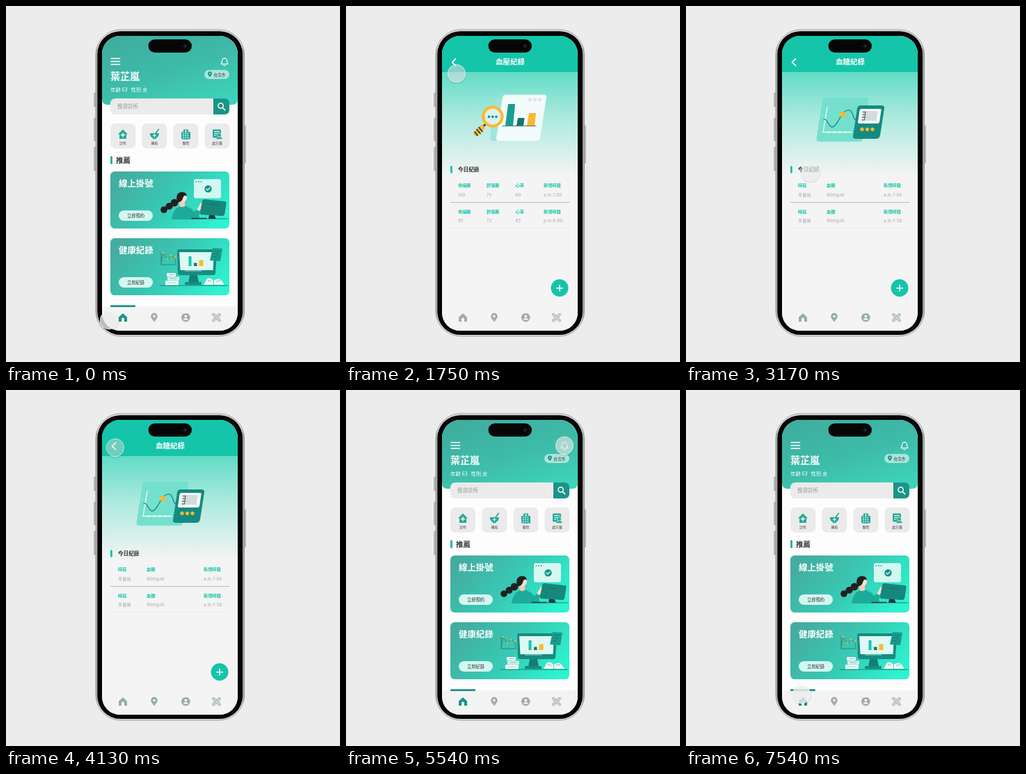
Animation of 480 by 512 pixels, one loop 7.58 s. Source, as an HTML page:

```html
<!DOCTYPE html>
<html lang="zh-Hant">
<head>
<meta charset="utf-8">
<title>健康 App</title>
<style>
html, body { margin: 0; width: 100%; height: 100%; overflow: hidden; background: #ececec; }
svg { display: block; width: 100vw; height: 100vh; }
text { font-family: "Noto Sans CJK TC", "Noto Sans CJK JP", "Noto Sans CJK", "Noto Sans", sans-serif; }
.latin { font-family: Inter, "Noto Sans", sans-serif; }
</style>
</head>
<body>
<svg id="stage" viewBox="0 0 480 512" xmlns="http://www.w3.org/2000/svg"></svg>
<script>
const LOOP = 7580;
const TEAL = '#14c5aa', DEEP = '#1a9488', GREY = '#a9a9a9', YELLOW = '#fbb92c';

const rect = (x, y, w, h, fill, rx = 0, extra = '') =>
  `<rect x="${x}" y="${y}" width="${w}" height="${h}" rx="${rx}" fill="${fill}" ${extra}/>`;
const dot = (x, y, r, fill, extra = '') => `<circle cx="${x}" cy="${y}" r="${r}" fill="${fill}" ${extra}/>`;
const shape = (d, fill, extra = '') => `<path d="${d}" fill="${fill}" ${extra}/>`;
const line = (d, color, width = 1) =>
  `<path d="${d}" fill="none" stroke="${color}" stroke-width="${width}" stroke-linecap="round" stroke-linejoin="round"/>`;
const text = (x, y, size, fill, str, weight = 400, extra = '') =>
  `<text x="${x}" y="${y}" font-size="${size}" fill="${fill}" font-weight="${weight}" xml:space="preserve" ${extra}>${str}</text>`;
const latin = (x, y, size, fill, str, weight = 400, extra = '') =>
  text(x, y, size, fill, str, weight, `class="latin" ${extra}`);
const at = (x, y, body) => `<g transform="translate(${x} ${y})">${body}</g>`;
const MID = 'text-anchor="middle"';

const pin = (color, hole) =>
  shape('M0 6.5C-2.5 3-4.8 1-4.8-1.7a4.8 4.8 0 0 1 9.6 0C4.8 1 2.5 3 0 6.5Z', color) + dot(0, -1.7, 1.7, hole);

const bell = (color, fill = 'none') =>
  `<path d="M-5 3.5Q-3.6 2-3.6-1a3.6 3.8 0 0 1 7.2 0Q3.6 2 5 3.5Z" fill="${fill}" stroke="${color}" stroke-width="1.2" stroke-linejoin="round"/>` +
  line('M-1.3 5.4Q0 6.2 1.3 5.4', color, 1.2);

function nav(bg, color, active = color) {
  const corner = [0, 90, 180, 270].map(a =>
    `<g transform="rotate(${a})">${line('M-5.5-2.8V-5.5H-2.8', color, 1.2)}` +
    rect(-3.8, -3.8, 3, 3, 'none', .6, `stroke="${color}" stroke-width="1.1"`) + '</g>').join('');
  return rect(138, 432, 195, 35, bg) +
    at(168, 448, shape('M-6-.5L0-6 6-.5V6H2V2.2a2 2 0 0 0-4 0V6H-6Z', active)) +
    at(213, 448, pin(color, bg)) +
    at(258.3, 448, dot(0, 0, 6.3, color) + dot(0, -1.8, 1.9, bg) + shape('M-3.5 3.4Q-3 .8 0 .8T3.5 3.4Z', bg)) +
    at(302.5, 448, corner);
}

function tile(x, label, icon) {
  return at(x, 169, rect(0, 0, 36, 36, '#ebebeb', 7) + at(18, 15.5, icon) +
    text(18, 30, 4.9, '#444', label, 500, MID));
}

function card(y, title, button, art) {
  return rect(150, y, 171, 82, 'url(#card)', 6) + text(162, y + 21.7, 12.4, '#fff', title, 700) +
    rect(162, y + 56, 49, 15, '#d3f8f1', 7.5) +
    text(186.5, y + 65.9, 6.3, '#333', button, 500, MID) + art;
}

const bookingArt =
  rect(270, 249, 39, 27.5, '#d3f8f1', 3) + [273.5, 277, 280.5].map(x => dot(x, 252.8, .9, DEEP)).join('') +
  dot(290.5, 263, 5.2, DEEP) + line('M288 263l1.8 1.8 3.2-3.4', '#fff', 1.1) +
  line('M238 306H318', '#1cab9a', 1.6) +
  shape('M245 291Q239 297 238 307H279L277 301 284 289 280 286 271 296Q262 287 252 287Z', '#1cab9a') +
  shape('M274 293L280 283 286 280 285 286 278 295Z', '#fbdcd0') +
  shape('M249 280H257V288Q252 291 249 287Z', '#f6c9bb') + dot(254, 276, 6, '#fbdcd0') +
  shape('M246 282Q243 271 250 268Q258 266 260 273Q255 271 254 277Q252 283 246 282Z', '#231f20') +
  dot(242, 283, 5.4, '#231f20') + dot(234.5, 288, 5, '#231f20') + dot(227, 293, 4.8, '#231f20') +
  shape('M292 300H299L302 306H291Z', '#243b3c') +
  shape('M285 278L314 281Q317 281 316.5 284L314 300Q313 302 311 302L281 300Q278 299 279 297L282 280Q283 278 285 278Z', '#17877c') +
  [294, 298, 302].map(x => line(`M${x} 284.5v2`, '#0d5f58', .9)).join('') +
  line('M267 305.5H288', '#243b3c', 1.4);

const recordArt =
  line('M222 402H318', '#17a493', 1.5) +
  line('M223 355V372H244', '#238177', .9) + line('M223 369L226 356 232 364 237 359 243 362 244 371', '#4c7466', .8) +
  [[226, 355], [232, 364], [237, 359], [243, 361]].map(p => dot(...p, 1.2, YELLOW)).join('') +
  shape('M249 350H300Q303 350 303 353L301 384Q301 387 298 387H250Q247 387 247 384L246 353Q246 350 249 350Z', '#178b7f') +
  shape('M249 354H299L297.5 380H250.5Z', '#dcf9f4') +
  rect(262.5, 360, 4, 14, TEAL) + rect(270, 369.5, 4.5, 4.5, '#17776f') + rect(277.5, 365.5, 6, 8.5, YELLOW) +
  rect(257, 380.5, 24, 1, '#8ed9cd') +
  shape('M264 387H275L277 398H262Z', '#137e74') + rect(257, 397, 24, 4, '#178b7f', 1.5) +
  shape('M297 348L311 349 308 367 293 366Z', '#1a9a8b') +
  line('M299 353h7M298 357h7M297.5 361h5', '#0f6f66', .8) +
  rect(231, 384, 13, 5, '#eefaf8', .8) + rect(232, 389.5, 17, 5.3, '#d8f1ed', .8) + rect(229, 395.2, 19, 6, '#fff', .8) +
  line('M235 386.5h6M236 392h9M233 398h11', '#55aea3', .7) +
  shape('M284 401L289 392Q295 390 298 395Q305 391 309 394L314 401Z', '#eefaf8') +
  line('M298 395L299 401M290 395l5 1M302 396l6-1', '#57a79d', .8);

const icons = {
  clinic: shape('M-7 0L0-7 7 0H5V6.5H-5V0Z', '#27a999') + line('M0-1.5v5M-2.5 1h5', '#fff', 1.4),
  pharmacy: shape('M-6.5-1.5H6.5Q6.5 4 2.5 5.2V6.8H-2.5V5.2Q-6.5 4-6.5-1.5Z', '#27a999') +
    line('M2-2L6-7', '#27a999', 1.8) + line('M0-.2v4M-2 1.8h4', '#fff', 1.1),
  hospital: rect(-3.5, -7, 7, 14, '#27a999', 1) + rect(-6.5, -3.5, 13, 10.5, '#27a999', 1) +
    [-4.5, -1.3, 2].map(x => [-2, 1, 4].map(y => rect(x, y, 1.6, 1.6, '#e4f5f2')).join('')).join('') +
    line('M0-6v3M-1.5-4.5h3', '#fff', .8),
  script: rect(-6.5, -7, 12, 12, '#27a999', 1.5) + line('M-4-4h7M-4-1.2h4M-4 1.6h2', '#fff', 1) +
    dot(3, 1, 2.8, '#27a999', 'stroke="#ebebeb" stroke-width=".8"') +
    shape('M-2 7Q-1.5 3.6 3 3.6T7.5 7Z', '#27a999', 'stroke="#ebebeb" stroke-width=".6"')
};

const home =
  rect(138, 43, 195, 424, '#fdfdfd') +
  shape('M138 43H333V134Q333 142 325 142H146Q138 142 138 134Z', 'url(#hero)') +
  line('M151 75.5h12.5M151 79.8h12.5M151 84.1h12.5', '#fff', 1.5) + at(314, 80, bell('#fff')) +
  text(150, 105.6, 14, '#fff', '葉芷嵐', 700) +
  text(150, 122.6, 7.4, '#fff', '年齡 63   性別 女', 500) +
  rect(285, 92, 36, 13, '#a9e5db', 6.5) + at(293, 98.3, `<g transform="scale(.62)">${pin(DEEP, '#a9e5db')}</g>`) +
  text(298.3, 100.6, 5.6, '#333', '台北市', 500) +
  rect(150, 133, 171, 23, '#ebebeb', 7) + shape('M298 133H314Q321 133 321 140V149Q321 156 314 156H298Z', DEEP) +
  `<circle cx="308.6" cy="143.3" r="3.6" fill="none" stroke="#fff" stroke-width="1.5"/>` + line('M311.4 146.2l3.2 3.4', '#fff', 1.6) +
  text(160, 147.3, 7.5, '#999', '搜尋診所') +
  tile(150, '診所', icons.clinic) + tile(195.3, '藥局', icons.pharmacy) +
  tile(240.5, '醫院', icons.hospital) + tile(285.5, '處方籤', icons.script) +
  rect(150, 216, 3, 11.5, '#2bb5a4', 1) + text(158, 225.5, 10.4, '#333', '推薦', 700) +
  card(238, '線上掛號', '立即預約', bookingArt) + card(334, '健康紀錄', '立刻紀錄', recordArt) +
  nav('#f3f3f3', GREY, DEEP) + rect(150, 430.3, 36, 2.8, DEEP, 1.2);

const header = title => rect(138, 43, 195, 52, TEAL) + line('M157.5 76l-5 4.8 5 4.8', '#fff', 1.8) +
  text(236, 84, 10.4, '#fff', title, 700, MID);

const detail = (title, section, art, rows, navColor = GREY) =>
  rect(138, 43, 195, 424, '#f4f4f4') + rect(138, 95, 195, 150, 'url(#sky)') + header(title) + art +
  rect(150, 230, 2.8, 10.5, TEAL, 1) + text(161, 237.8, 7.6, '#333', section, 700) + rows +
  nav('#f4f4f4', navColor) +
  dot(307, 405.5, 12.5, TEAL) + line('M302.8 405.8h8.4M307 401.6v8.4', '#fff', 1.6);

const medicineArt =
  shape('M190 165C182 145 202 136 223 137C236 129 270 129 279 140C287 150 279 174 262 181H205Q193 177 190 165Z', '#8fe0d5') +
  line('M186 194.5H276', '#3c7775', 1.8) +
  shape('M219 139.5H271Q275 139.5 274.5 143L269 194H211L215 143Q215.5 139.5 219 139.5Z', '#fdfefe') +
  [222, 228, 234].map(x => dot(x, 147, 1.7, '#efefef')).join('') +
  `<ellipse cx="239.5" cy="169" rx="13.8" ry="12.4" fill="#1c8f86" transform="rotate(-35 239.5 169)"/>` +
  line('M233.5 169.5l4.5 4.2 8-8.5', '#fff', 2.8) +
  at(211, 151, `<g transform="rotate(5) scale(1.35)">${bell(DEEP, DEEP)}</g>`) +
  shape('M196 177H212Q215 178 214.5 182L212 194H195Q192 194 192.5 190L194 180Q194 178 196 177Z', DEEP) +
  shape('M197 171H213Q215 171 214.6 173L213.8 177H196L196 173Q196 171 197 171Z', '#15c0aa') +
  shape('M194 180H214L212.5 190H192.5Z', '#f8ba31') + line('M196 183l3 4M201 182l3 5M207 182l2 5', '#e09c1c', .8) +
  dot(277.3, 157, 12, '#e8f6f7', `stroke="${YELLOW}" stroke-width="5"`) + line('M276.5 152L277.5 158 281 159', '#3c6264', 1.1);

const alarms = [['A.M.', '07:00', true], ['A.M.', '12:00'], ['P.M.', '06:00']].map(([half, time, on], i) => {
  const y = 271 + i * 40;
  return latin(161, y + 6.8, 6.8, '#b2b2b2', half, 500) + latin(178, y + 6.8, 19, '#aaa', time, 500) +
    rect(296.7, y - 3.4, 12.6, 6.8, on ? TEAL : '#f4f4f4', 3.4, `stroke="${TEAL}" stroke-width="1.2"`) +
    (on ? dot(305.8, y, 2.1, '#fff') : rect(298.4, y - 1.6, 4.6, 3.2, TEAL, 1.6)) +
    (i ? rect(150, y + 18.2, 171, .8, '#b5b5b5') : '');
}).join('');

const pressureArt =
  shape('M215 133H270L262 194H212Q206 194 207 188Z', '#9fe5da') +
  shape('M230 127.5H285Q288.5 127.5 288 131L279 190Q278 194 274 194H220Q215.5 194 216 190L225 131Q226 127.5 230 127.5Z', '#f0fbfa') +
  [264.5, 271.5, 278.5].map(x => dot(x, 134.7, 2.4, '#e7dedf')).join('') +
  shape('M233 141H243L240 172H229Z', '#159f90') + shape('M247 161H256.5L255 172H245Z', '#16756e') +
  shape('M263 154H273L271 172H260Z', '#f8b632') + line('M225 172.6H273', '#4d6d6d', 1) +
  line('M201 169.5L196 174.5', '#34393a', 3) + line('M195.5 175L187 183.5', YELLOW, 7) +
  line('M191 174.5l5 6M188 177.5l5 6M185 181l4 5', '#32393b', 1.8) +
  dot(210.8, 159, 13.6, '#dcf2f0', `stroke="${YELLOW}" stroke-width="4.2"`) +
  [205.5, 210.8, 216].map(x => dot(x, 159.2, 1.8, '#178b80')).join('');

const glucoseArt =
  shape('M201 131.5H259Q263 131.5 262.3 136L254 191Q253.5 195 249 195H191Q187 195 187.5 191L196 136Q197 131.5 201 131.5Z', '#75dfce') +
  line('M203 146L197 181.5H238', '#f2fffc', 1.3) + [205, 213, 221, 229].map(x => line(`M${x} 180v3`, '#f2fffc', .9)).join('') +
  line('M198 163C203 161 205 174 210 174C217 174 221 157 228 152C237 146 238 152 241 160C243 167 247 160 250 158', '#168c80', 1.3) +
  dot(225.3, 156, 4, YELLOW) +
  shape('M251 143H281Q285.5 143 285 147L279 186Q278 191 273 191H244Q239.500 191 240 187L246 147Q247 143 251 143Z', '#158a80') +
  shape('M252 148H279Q281 148 280.5 150L278 167Q277.500 169 275 169H249Q246.500 169 247 167L249.500 150Q250 148 252 148Z', '#f6fbfb') +
  shape('M255 151H275.5L273.500 165H252.500Z', '#d4d9d9') +
  line('M254 152.500h4M253.500 156h4M253 160h4M252.500 164h4M258 152.500l-1.500 11', '#3d4c4d', .9) +
  [253, 260.500, 268].map(x => dot(x, 177.300, 2.6, YELLOW)).join('');

// Two records of [x, label, first value, second value]
function table(columns) {
  const cells = columns.map(([x, label, ...values]) => values.map((value, i) => {
    const y = 260.4 + i * 37.4;
    const write = /[a-z0-9]/.test(value) ? latin : text;
    return text(x, y, 6.2, TEAL, label, 700) + write(x, y + 13.2, 6, '#a5a5a5', value, 400, 'letter-spacing=".25"');
  }).join('')).join('');
  return cells + rect(150, 282.2, 171, .8, '#adadad') + rect(150, 319.300, 171, .6, '#e3e3e3');
}

const pressureRows = table([[161, '收縮壓', '100', '95'], [202, '舒張壓', '70', '72'],
  [243.500, '心率', '80', '85'], [284, '新增時間', 'a.m.7:00', 'p.m.8:00']]);
const glucoseRows = table([[161, '時段', '早餐前', '早餐後'], [202, '血糖', '80mg/dl', '90mg/dl'],
  [284, '新增時間', 'a.m.7:00', 'a.m.7:30']]);

const notices = [
  [118.300, '系統更新通知', '2025/01/26  22:00'], [155, '系統更新通知', '2025/01/25  22:00'],
  [192.300, '吃藥提醒', '2024/12/28  22:00'], [230.500, '吃藥提醒', '2024/12/26  22:00'], [268.500, '吃藥提醒', '2024/12/25  22:00']
].map(([y, title, date], i) => {
  const fresh = i < 2;
  return dot(162.500, y, 12, DEEP) + text(185, y - 4, 8.7, fresh ? TEAL : '#333', title, 700) +
    latin(185, y + 10.500, 4.900, '#a2aaa9', date, 400, 'letter-spacing=".3"') +
    line(`M316.800 ${y - 6}l4 4-4 4`, fresh ? TEAL : '#aaa', 1.4);
}).join('');

const notifications =
  rect(138, 43, 195, 424, '#f8f8f8') + rect(138, 95, 195, 195, '#fdfdfd') + header('通知') +
  rect(138, 95, 195, 79.500, '#dffaf5') + rect(150, 136.200, 171, .7, '#a3d8cf') +
  rect(150, 212, 171, .6, '#e8e8e8') + rect(150, 250, 171, .6, '#e8e8e8') + rect(138, 290, 195, .6, '#ededed') +
  notices + nav('#f1f1f1', GREY);

const screens = {
  home,
  medicine: detail('用藥提醒', '提醒時間', medicineArt, alarms),
  pressure: detail('血壓紀錄', '今日紀錄', pressureArt, pressureRows),
  glucose: detail('血糖紀錄', '今日紀錄', glucoseArt, glucoseRows, '#93aeac'),
  notifications
};

const stops = (...list) => list.map(([o, c, a = 1]) => `<stop offset="${o}" stop-color="${c}" stop-opacity="${a}"/>`).join('');
const metal = 'fill="#b9b9b9" stroke="#9a9a9a" stroke-width=".5"';
const sideKey = (x, y, h) => `<rect x="${x}" y="${y}" width="3" height="${h}" rx="1" ${metal}/>`;

const stage = document.getElementById('stage');
stage.innerHTML = `<defs>
  <clipPath id="glass"><rect x="138" y="43" width="195" height="424" rx="26"/></clipPath>
  <linearGradient id="hero" x1=".2" y1="0" x2=".8" y2="1">${stops([0, '#3fae9f'], [.5, '#3dbba9'], [1, '#3ed3ba'])}</linearGradient>
  <linearGradient id="card" x1="0" y1=".3" x2="1" y2=".7">${stops([0, '#44aca0'], [.5, '#38c9b4'], [1, '#2df3d0'])}</linearGradient>
  <linearGradient id="sky" x1="0" y1="0" x2="0" y2="1">${stops([0, '#62dcc7'], [.45, '#aeeadf'], [1, '#f4f4f4'])}</linearGradient>
  <linearGradient id="metal">${stops([0, '#9b9b9b'], [.02, '#e2e2e2'], [.98, '#dedede'], [1, '#8f8f8f'])}</linearGradient>
</defs>
${rect(0, 0, 480, 512, '#ececec')}
${sideKey(126.500, 125, 20)}${sideKey(126.500, 161, 33)}${sideKey(126.500, 203, 34)}${sideKey(341.500, 172, 54)}
${rect(129, 34, 213.500, 441, 'url(#metal)', 36, 'stroke="#8e8e8e" stroke-width=".8"')}
${rect(131.300, 36.200, 208.800, 436.800, '#050505', 33)}
<g clip-path="url(#glass)">${Object.entries(screens).map(([id, body]) => `<g id="${id}">${body}</g>`).join('')}</g>
${rect(204.500, 48, 62.500, 19, '#060606', 9.500)}${dot(257.500, 57.500, 3, '#12161d')}${dot(257.500, 57.500, 1.2, '#26324a')}
<g id="touch">${dot(.4, 1.2, 14, '#000', 'opacity=".08"')}${dot(0, 0, 13, '#f1f1f1', 'id="pad"')}
<circle r="12.800" fill="none" stroke="#fff" stroke-opacity=".65" stroke-width=".8"/></g>`;

const scenes = [[0, 'home'], [700, 'medicine'], [1700, 'pressure'], [2900, 'glucose'],
  [4450, 'home'], [5560, 'notifications'], [6450, 'home']];

// time, x, y, opacity of the touch pad
const path = [
  [0, 148, 452, .78], [560, 187, 397, .75], [700, 187, 397, .6], [1040, 186, 290, .82],
  [1500, 157, 83, .5], [1700, 157, 83, .5], [2020, 186, 290, .8], [2380, 157, 83, .5],
  [2900, 157, 83, .5], [3300, 186, 290, .8], [3900, 157, 83, .42], [4250, 157, 83, .42],
  [4720, 168, 449, .75], [4900, 168, 449, .75], [5450, 314, 80, .6], [5580, 314, 80, .6],
  [6210, 155, 68, .72], [6310, 155, 80, .5], [6500, 155, 80, .5], [7500, 166, 438, .8], [LOOP, 166, 438, .8]
];

const node = id => document.getElementById(id);
const ease = p => p * p * (3 - 2 * p);

function draw(t) {
  const current = scenes.filter(([start]) => start <= t).pop()[1];
  for (const id in screens) node(id).style.display = id === current ? '' : 'none';
  const i = path.findIndex(([end]) => end > t);
  const a = path[i - 1], b = path[i];
  const p = ease((t - a[0]) / (b[0] - a[0]));
  const [, x, y, alpha] = a.map((v, k) => v + (b[k] - v) * p);
  node('touch').setAttribute('transform', `translate(${x} ${y})`);
  node('pad').setAttribute('opacity', alpha);
}

const began = performance.now();
function tick() {
  draw((performance.now() - began) % LOOP);
  requestAnimationFrame(tick);
}
tick();
</script>
</body>
</html>
```
